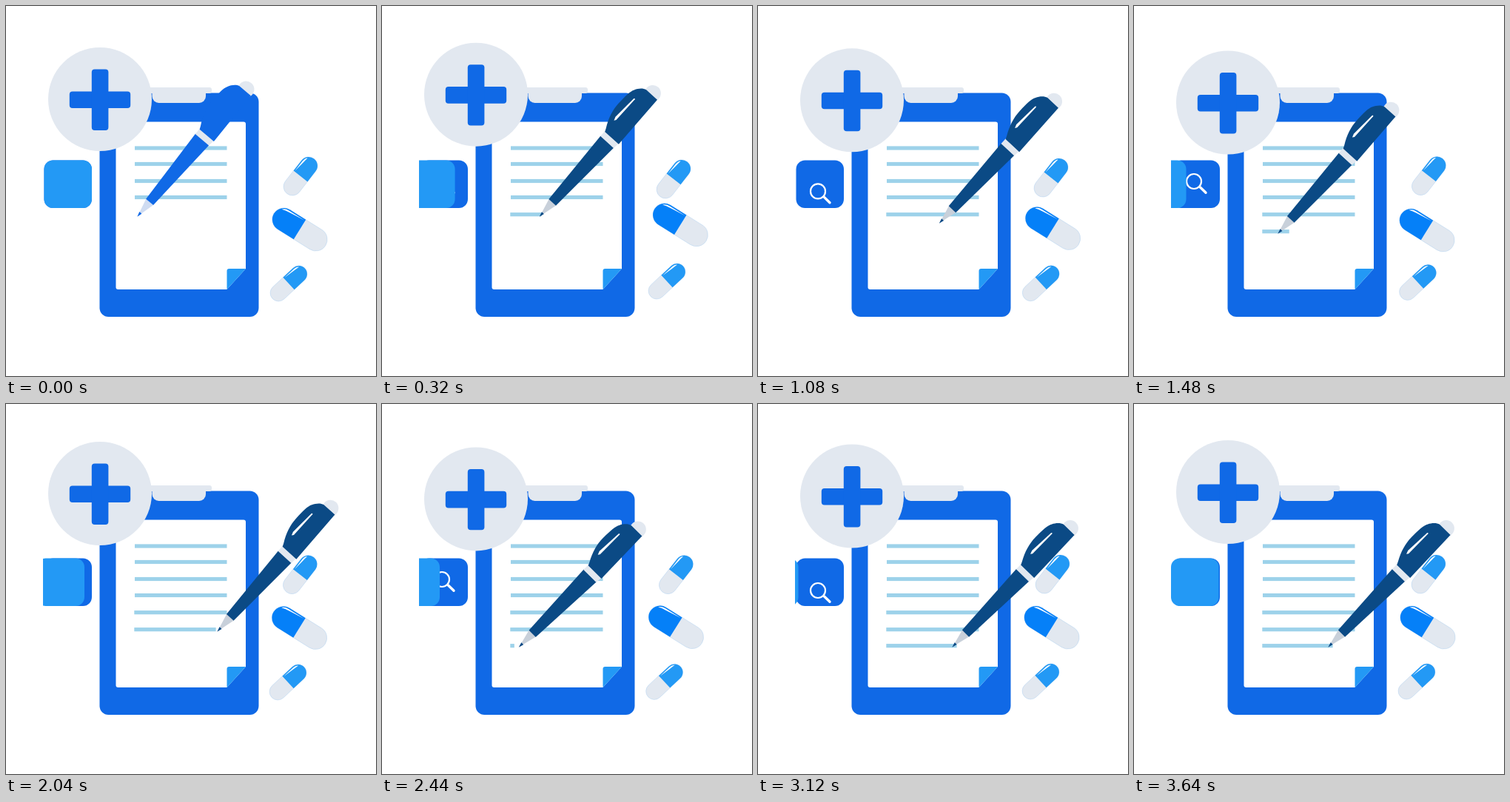
These frames come from a looping animation (500 px wide and 500 px high, 3680 ms). An HTML page:

```html
<!DOCTYPE html>
<html lang="en">
<head>
<meta charset="utf-8">
<title>Medical notes</title>
<style>
  html, body { margin: 0; width: 100%; height: 100%; overflow: hidden; background: #fff; }
  svg { display: block; width: 100%; height: 100%; }
  .blue { fill: #1069e6; }
  .sky { fill: #2399f5; }
  .grey { fill: #e2e8f0; }
  .rule { fill: #9dd2ea; }
  .navy { fill: #0b4a85; }
  .nib { fill: #c8d0da; }
  .wet .navy { fill: #1069e6; }
  .wet .nib { fill: #cfdcf2; }
  .wet .shine { display: none; }
</style>
</head>
<body>
<svg viewBox="0 0 500 500">
  <defs>
    <clipPath id="edge"><rect x="50" y="200" width="80" height="80"/></clipPath>
  </defs>

  <g id="board">
    <rect class="blue" x="126.5" y="117.5" width="215" height="302.5" rx="12"/>
    <path fill="#fff" d="M151.5 156.5H321a3 3 0 0 1 3 3V355L298.5 383H151.5a3 3 0 0 1-3-3V159.5a3 3 0 0 1 3-3z"/>
    <path class="sky" d="M324 355L298.5 383V358a3 3 0 0 1 3-3z"/>
    <rect class="grey" x="190" y="110" width="88" height="8" rx="3"/>
    <path class="grey" d="M197.5 114H270V122a9 9 0 0 1-9 9H206.5a9 9 0 0 1-9-9z"/>
  </g>
  <g id="rules" class="rule"></g>

  <g clip-path="url(#edge)">
    <rect class="blue" x="51.5" y="208.5" width="64.5" height="64.5" rx="12"/>
    <g id="lens" fill="none" stroke="#fff" stroke-linecap="round">
      <circle cx="81" cy="237" r="10" stroke-width="2.2"/>
      <path d="M89.5 245L97 252.3" stroke-width="3.4"/>
    </g>
    <rect id="cover" class="sky" x="51.5" y="208.5" width="64.5" height="64.5" rx="12"/>
  </g>

  <g id="badge">
    <circle class="grey" cx="127" cy="0" r="70"/>
    <rect class="blue" x="85.8" y="-10.6" width="82.4" height="22.6" rx="4"/>
    <rect class="blue" x="115.8" y="-40.5" width="22.6" height="82.4" rx="4"/>
  </g>

  <g id="pills"></g>

  <!-- the pen stands upright with its tip at 0,0 -->
  <g id="pen">
    <circle class="grey" cx="1.6" cy="-225.5" r="11"/>
    <path class="nib" d="M0 0L-6.5 -25.5H6.5z"/>
    <path class="navy" d="M0 1L-2 -6H2z"/>
    <path class="navy" d="M-6.5 -25H6.5L12 -135.5H-12z"/>
    <path class="grey" d="M-12 -135H12L13 -144H-12z"/>
    <path class="navy" d="M-11.5 -143.5L-13.5 -148C-20 -160 -23.5 -172 -23.5 -184C-23.5 -198 -23 -207 -20 -212C-17.5 -217 -13 -222 -8 -223H12L13.7 -143.5z"/>
    <path class="shine" fill="#fff" d="M-12.6 -163L-10.8 -165.5V-203Q-11.4 -205 -12.6 -203L-14.4 -168z"/>
  </g>
</svg>
<script>
const LOOP = 3680, STEP = 40, SLIDE = 1840;
const $ = id => document.getElementById(id);

// Smooth curve through [time, value] keys, flat at every turning point.
function curve(...keys) {
  const n = keys.length;
  const sec = i => (keys[i + 1][1] - keys[i][1]) / (keys[i + 1][0] - keys[i][0]);
  const slope = keys.map((k, i) => {
    if (i === 0) return sec(0);
    if (i === n - 1) return sec(n - 2);
    const a = sec(i - 1), b = sec(i);
    return a * b <= 0 ? 0 : 2 * a * b / (a + b);
  });
  return t => {
    if (t <= keys[0][0]) return keys[0][1];
    if (t >= keys[n - 1][0]) return keys[n - 1][1];
    let i = 0;
    while (t >= keys[i + 1][0]) i++;
    const [t0, a] = keys[i], [t1, b] = keys[i + 1];
    const h = t1 - t0, u = (t - t0) / h, v = 1 - u;
    return v * v * ((1 + 2 * u) * a + u * h * slope[i]) +
           u * u * ((3 - 2 * u) * b - v * h * slope[i + 1]);
  };
}

const badgeY = curve([0, 126], [420, 119], [680, 121], [1430, 131], [1480, 130.5], [1880, 119],
  [2040, 121], [2240, 124.8], [2440, 128.4], [2740, 131], [3120, 124.5], [3360, 120], [3580, 118.9], [3640, 119]);
const coverX = curve([0, 0], [200, -10], [600, -38], [680, -46], [1060, -66], [1280, -61.5], [1480, -45.5],
  [1800, -1.5], [1840, 0]);
const lensY = curve([0, 0], [680, 0], [1200, 15.5], [1280, 15], [1480, 0], [1840, 0]);

const penX = curve([0, 178], [680, 254], [960, 288], [1240, 180], [1480, 195], [2040, 286], [2080, 288],
  [2400, 181], [2440, 185.5], [3120, 263]);
const penY = curve([0, 284], [960, 284], [1240, 307], [2080, 307], [2400, 328], [3120, 328]);
const penTilt = curve([0, 40.1], [680, 43.6], [1480, 42.1], [2040, 42.1], [2440, 44.9], [3120, 44.4]);

// Rules: four finished ones, then three written with the pen.
const rules = [192, 213.5, 236.5, 258.5, 281.7, 304.7, 326.7].map((y, i) => {
  const r = make("rect", { x: i < 4 ? 174 : 173.3, y: y - 2.6, height: 5.2, width: 124.5 });
  $("rules").append(r);
  return r;
});
const starts = [0, 1204, 2398];

const pills = [
  { x: 398, y: 230, turn: -52, d: 35.6, r: 12, side: 1, fill: "#2399f5",
    shift: curve([0, 0], [300, -4], [680, 4], [1080, -2], [1480, 0.4], [2040, -0.6], [2440, -0.6], [3120, 0]) },
  { x: 397, y: 302, turn: 212, d: 51, r: 15.5, side: -1, fill: "#0580f8",
    shift: curve([0, 0], [280, 6.5], [680, -3], [1080, 1.5], [1480, -1], [2040, -0.5], [2440, 0.4], [3120, 0]) },
  { x: 382, y: 375, turn: -43, d: 37.5, r: 11.2, side: 1, fill: "#2399f5",
    shift: curve([0, 0], [300, 3], [680, -1], [1480, 1.5], [2040, -1], [2440, -0.4], [3120, 0]) }
];

function make(tag, attrs) {
  const el = document.createElementNS("http://www.w3.org/2000/svg", tag);
  for (const k in attrs) el.setAttribute(k, attrs[k]);
  return el;
}

for (const p of pills) {
  const { d, r } = p, c = d / 2, y = -r + 1.6;
  p.el = make("g", {});
  const body = make("g", { transform: `rotate(${p.turn}) scale(1 ${p.side})` });
  body.append(
    make("rect", { x: -c - r, y: -r, width: d + 2 * r, height: 2 * r, rx: r,
      fill: "#e2e8f0", stroke: "#a9cdf0", "stroke-width": 0.4 }),
    make("path", { d: `M0 ${-r}H${c}a${r} ${r} 0 0 1 0 ${2 * r}H0z`, fill: p.fill }),
    make("path", { d: `M1 ${y}H${c}Q${c + r * 0.4} ${y} ${c + r * 0.62} ${y + r * 0.24}Q${c + r * 0.3} ${y + 2.2} ${c - 2} ${y + 1.8}z`,
      fill: "#fff" })
  );
  p.el.append(body);
  $("pills").append(p.el);
}

const move = (el, x, y, more = "") => el.setAttribute("transform", `translate(${x} ${y})${more}`);

function draw(t) {
  move($("badge"), 0, badgeY(t));
  move($("cover"), coverX(t % SLIDE), 0);
  move($("lens"), 0, lensY(t % SLIDE));
  move($("pen"), penX(t), penY(t), ` rotate(${penTilt(t)})`);
  $("pen").classList.toggle("wet", t < STEP);
  starts.forEach((s, i) => {
    const w = (Math.min(t, 3120) - s) * 0.132;
    rules[4 + i].setAttribute("width", Math.max(0, Math.min(125.2, w)));
  });
  for (const p of pills) {
    const k = p.shift(t);
    move(p.el, p.x + k, p.y - k);
  }
}

let begin;
function tick(now) {
  begin ??= now;
  draw(Math.floor(((now - begin) % LOOP) / STEP) * STEP);
  requestAnimationFrame(tick);
}
draw(0);
requestAnimationFrame(tick);
</script>
</body>
</html>
```
